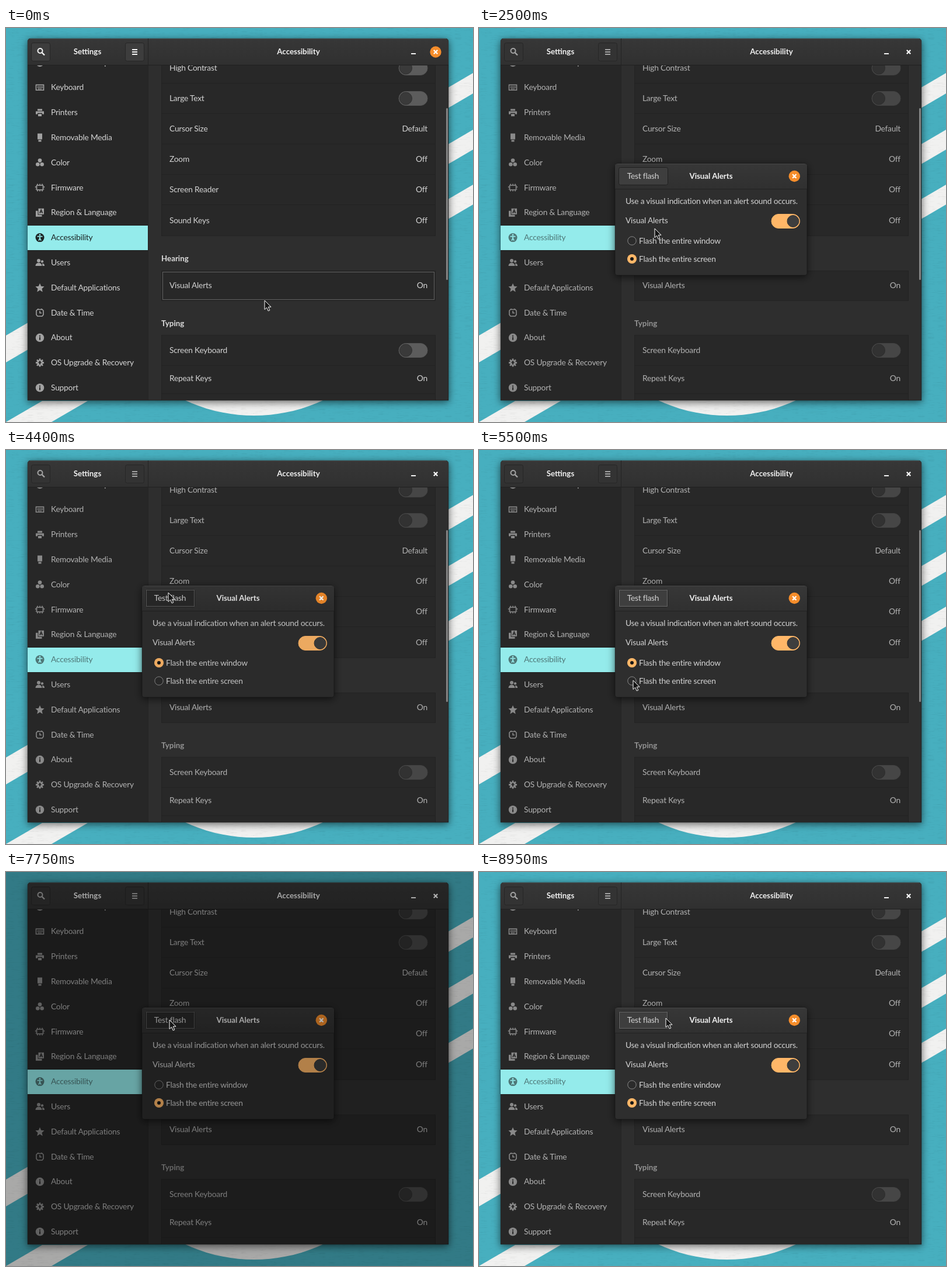
Recreate the animation shown at these times as an HTML page. Size 800 px wide and 674 px high, loop 9000 ms.

```html
<!DOCTYPE html>
<html lang="en">
<head>
<meta charset="utf-8">
<title>Visual alerts settings</title>
<style>
  html, body { margin: 0; height: 100%; overflow: hidden; background: #47afbf; }
  svg { display: block; width: 100vw; height: 100vh; }
  text { font: 13.8px Lato, "Open Sans", sans-serif; letter-spacing: -.22px; fill: #d4d4d4; white-space: pre; }
  .bold { font-size: 13.3px; font-weight: 700; letter-spacing: 0; fill: #f2f2f2; }
  .end { text-anchor: end; }
  .mid { text-anchor: middle; }
  .dim { opacity: var(--dim); }
  .soft { opacity: var(--soft); }
  .heading { fill: #dcdcdc; }
  .active { opacity: var(--lit); }
  .icon { fill: #a2a2a2; stroke: #a2a2a2; stroke-width: 0; }
  .dark text, .dark .icon { fill: #1c2424; }
  .line { fill: none; stroke-width: 1.6; }
  .hole { fill: #272727; stroke: #272727; }
  .focus { fill: none; stroke: #999; stroke-dasharray: 1 1; }
</style>
</head>
<body>
<svg id="stage" viewBox="0 0 800 674"></svg>
<script>
const stage = document.getElementById('stage');

const rect = (x, y, w, h, fill, more = '') =>
  `<rect x="${x}" y="${y}" width="${w}" height="${h}" fill="${fill}" ${more}/>`;
const circle = (x, y, r, fill, more = '') =>
  `<circle cx="${x}" cy="${y}" r="${r}" fill="${fill}" ${more}/>`;
const path = (d, more = '') => `<path d="${d}" ${more}/>`;
const text = (x, y, label, cls = '') =>
  `<text x="${x}" y="${y}" class="${cls}">${label}</text>`;
const focusRing = (id, x, y, w, h) =>
  `<rect id="${id}" class="focus" x="${x + .5}" y="${y + .5}" width="${w}" height="${h}"/>`;
const cross = (x, y) =>
  path(`M${x - 3.2} ${y - 3.2}l6.4 6.4m0-6.4l-6.4 6.4`, 'stroke="#fff" stroke-width="2.2"');
const closeButton = (x, y) => circle(x, y, 9.7, '#f58d2b');

const icons = {
  keyboard: path('M-6.5-4.5h13v9h-13z', 'class="line"') +
    path('M-4-2h9M-4 .3h9M-3 2.6h6', 'class="line" stroke-dasharray="1.6 1"'),
  printer: path('M-4-6h8v3h-8zM-7-2h14v5h-3v-2h-8v2h-3zM-3 2.5h6v4h-6z'),
  media: path('M-4-7h8v10h-8zM-2.5 4h5v3h-5z'),
  color: circle(0, -3.6, 3.3, '') + circle(-3.7, 3, 3.3, '') + circle(3.7, 3, 3.3, ''),
  chip: path('M-5.5-3.8h11v7.6h-11z', 'class="line"') +
    path('M-5-5.5h10M-5 5.5h10M-7.3-2v4.5M7.3-2v4.5', 'class="line" stroke-dasharray="2 2"'),
  region: path('M-2.5-7h9.5v10h-9.5zM-7-3h3.5v7h7v3h-10.5z') +
    path('M-.3 1l2.5-6 2.5 6M.7-1h3', 'class="line hole" style="fill:none;stroke-width:1.4"'),
  access: circle(0, 0, 7.5, ''),
  users: circle(-2, -3.3, 3, '') + path('M-7.5 5.5c0-7 11-7 11 0z') +
    circle(4, -2, 2.2, '') + path('M4 1.3c3 0 4 2 4 4.2h-3.5z'),
  star: path('M0-7.5l2.2 5.1 5.4.5-4.1 3.7 1.2 5.4L0 4.4l-4.7 2.8 1.2-5.4-4.1-3.7 5.4-.5z'),
  clock: path('M-4-5.5h8l2 2v7l-2 2.5h-8l-2-2.5v-7z', 'class="line"') +
    path('M0-3v3.5h3M-3-7v2M3-7v2', 'class="line"'),
  info: circle(0, 0, 7.2, '') + path('M-1-4h2v2h-2zM-1-1h2v5h-2z', 'class="hole"'),
  gear: circle(0, 0, 5.2, '') + path('M0-7v14M-7 0h14M-5-5L5 5M5-5L-5 5', 'stroke-width="2.6"') +
    path('M-1.2 3v-2.8h-2L0-3.5 3.2.2h-2V3z', 'class="hole"'),
};
const figure = path('M-4.5-2h9M0-2v3.5M0 1l-2 4M0 1l2 4', 'fill="none" stroke="#94ebeb" stroke-width="1.8"') +
  circle(0, -4.6, 1.4, '#94ebeb');

const sidebarItems = [
  ['info', 'Mouse &amp; Touchpad'], ['keyboard', 'Keyboard'], ['printer', 'Printers'],
  ['media', 'Removable Media'], ['color', 'Color'], ['chip', 'Firmware'],
  ['region', 'Region &amp; Language'], ['access', 'Accessibility'], ['users', 'Users'],
  ['star', 'Default Applications'], ['clock', 'Date &amp; Time'], ['info', 'About'],
  ['gear', 'OS Upgrade &amp; Recovery'], ['info', 'Support'],
];

function sidebarItem([icon, label], i) {
  const y = 59 + 42.8 * i;
  const selected = icon === 'access';
  return (selected ? rect(37, 337, 206, 44, '#202020') + rect(37, 338, 206, 42, '#94ebeb') : '') +
    `<g class="${selected ? 'soft dark' : 'dim'}">
      <g class="icon" transform="translate(58 ${y})">${icons[icon]}${selected ? figure : ''}</g>
      ${text(77, y + 4.5, label)}</g>`;
}

const offSwitch = y => `<g class="soft">` +
  rect(673, y - 12, 49, 24, '#5c5c5c', 'rx="12" stroke="#565656"') +
  circle(685, y, 10.5, '#3a3a3a', 'stroke="#303030"') + '</g>';

const row = (y, label, value) => text(280, y + 4.5, label, 'dim') +
  (value ? text(722, y + 4.5, value, 'dim end') : offSwitch(y + .5));

const card = (y, h, ...separators) =>
  rect(266.5, y + .5, 469, h, '#282828', 'stroke="#232323"') +
  separators.map(s => rect(267, s, 468, 1, '#222')).join('');

const headerButton = (x, icon) =>
  rect(x + .5, 25.5, 32, 31, '#333', 'rx="3" stroke="#262626"') +
  `<rect class="active" x="${x + 1}" y="26" width="31" height="30" rx="3" fill="#3d3d3d"/>` +
  `<g class="soft" fill="none" stroke="#f4f4f4" stroke-width="2">${icon}</g>`;

const radio = (id, y, label) =>
  circle(262, y, 7.2, '#2b2b2b', 'stroke="#8a8a8a"') +
  `<g id="${id}">${circle(262, y, 8, '#ffb768')}${circle(262, y, 3, '#161616')}</g>` +
  text(274, y + 4.5, label);

const stripe = (x, y, h) => path(`M${x} ${y + 35}L${x + 60} ${y}V${y + h}L${x} ${y + h + 35}z`);

const wallpaper = rect(0, 0, 800, 674, '#47afbf') +
  `<g fill="#f1f1f0">` +
  stripe(0, 491, 46) + path('M0 674L62 638H140L78 674z') +
  stripe(740, 77, 35) + stripe(740, 174, 34) + stripe(740, 268, 34) +
  circle(425, 382, 281, '#f1f1f0') + '</g>' +
  rect(0, 0, 800, 674, '#000', 'filter="url(#grain)" opacity=".08"');

const settings = `<g filter="url(#shadow)">${path('M37 637V23a5 5 0 0 1 5-5H753a5 5 0 0 1 5 5V637z', 'fill="#2f2f2f" stroke="#000" stroke-opacity=".3"')}</g>` +
  rect(37, 64, 207, 573, '#272727') +
  path('M37 63V23a5 5 0 0 1 5-5H753a5 5 0 0 1 5 5V63z', 'fill="url(#header)"') +
  rect(41, 18, 713, 1, '#484848') + rect(37, 63, 721, 1, '#202020') + rect(243, 18, 1, 619, '#242424') +
  headerButton(43, circle(58.5, 39, 4, 'none') + path('M61.5 42L66 46.5', 'stroke-width="2.4"')) +
  headerButton(204, path('M216 37h9M216 41h9M216 45h9', 'stroke-width="1.8"')) +
  text(139.5, 45, 'Settings', 'bold mid') + text(501, 45, 'Accessibility', 'bold mid') +
  rect(694, 43, 8, 2, '#f0f0f0') +
  `<g class="active">${closeButton(736, 41)}</g>` + cross(736, 41) +
  `<g clip-path="url(#view)">
    ${sidebarItems.map(sidebarItem).join('')}
    ${card(40, 315, 94, 146, 198, 250, 302)}
    ${row(68, 'High Contrast')}${row(120, 'Large Text')}${row(172, 'Cursor Size', 'Default')}
    ${row(224, 'Zoom', 'Off')}${row(276.5, 'Screen Reader', 'Off')}${row(329, 'Sound Keys', 'Off')}
    ${text(266, 399, 'Hearing', 'bold heading soft')}
    ${card(415, 51)}${row(440, 'Visual Alerts', 'On')}
    <g class="active">${focusRing('rowFocus', 268, 417, 465, 47)}</g>
    ${text(266, 510, 'Typing', 'bold heading soft')}
    ${card(525, 130, 577, 625)}
    ${row(551, 'Screen Keyboard')}${row(599, 'Repeat Keys', 'On')}${text(280, 648, 'Cursor Blinking', 'dim')}
    ${rect(754, 137, 3, 294, '#858585', 'rx="1.5" id="scrollbar"')}
  </g>`;

const dialog = `<g id="dialog">
  <g filter="url(#shadow)">${rect(233, 232, 329, 191, '#2f2f2f', 'rx="4" stroke="#000" stroke-opacity=".3"')}</g>` +
  path('M233 275V236a4 4 0 0 1 4-4H558a4 4 0 0 1 4 4V275z', 'fill="url(#header)"') +
  rect(237, 232, 321, 1, '#484848') + rect(233, 275, 329, 1, '#222') +
  `<rect id="button" x="239.5" y="238.5" width="84" height="30" rx="3" stroke="#202020"/>` +
  focusRing('buttonFocus', 240, 239, 82, 28) +
  text(281, 257.5, 'Test flash', 'mid') + text(397.5, 257.5, 'Visual Alerts', 'bold mid') +
  closeButton(540.3, 253.5) + cross(540.3, 253.5) +
  text(251, 301, 'Use a visual indication when an alert sound occurs.') +
  text(251, 334, 'Visual Alerts') +
  rect(501, 318.5, 48.5, 24, '#ffb768', 'rx="12" stroke="#ffb768"') +
  circle(538, 330.5, 10, '#3e3e3e', 'stroke="#333"') +
  radio('windowDot', 364, 'Flash the entire window') +
  radio('screenDot', 395, 'Flash the entire screen') +
  focusRing('windowFocus', 250, 353, 300, 21) + focusRing('screenFocus', 250, 384, 300, 21) +
  rect(233, 232, 329, 191, '#000', 'id="windowFlash" rx="4"') + '</g>';

stage.innerHTML = `<defs>
    <linearGradient id="header" x2="0" y2="1"><stop stop-color="#373737"/><stop offset="1" stop-color="#303030"/></linearGradient>
    <filter id="shadow" x="-10%" y="-15%" width="120%" height="130%">
      <feDropShadow dx="0" dy="3" stdDeviation="7" flood-opacity=".6"/></filter>
    <filter id="grain" x="0" y="0" width="100%" height="100%">
      <feTurbulence baseFrequency=".06 .5" numOctaves="2" seed="4"/>
      <feColorMatrix values="0 0 0 0 0  0 0 0 0 0  0 0 0 0 0  1.6 0 0 0 -.5"/></filter>
    <clipPath id="view">${rect(37, 64, 721, 573, '#000')}</clipPath>
  </defs>` + wallpaper + settings + dialog +
  rect(0, 0, 800, 674, '#000', 'id="screenFlash"') +
  path('M0 0V15.5L3.6 12.2 6.2 18 8.8 16.9 6.3 11.2H11z',
    'id="cursor" fill="#151515" stroke="#fff" stroke-linejoin="round"');

// time, x, y of the pointer tip
const pointer = [
  [0, 443, 466], [450, 538, 427], [1500, 538, 427], [1550, 539, 427], [1650, 539, 427],
  [1950, 515, 350], [2200, 400, 316], [2500, 301, 343], [2600, 288, 335], [2900, 272, 322],
  [3250, 259, 353], [3550, 258, 353], [4000, 278, 244], [4800, 278, 244], [5050, 284, 310],
  [5300, 263, 394], [5450, 263, 394], [5500, 264, 394], [5850, 264, 394], [6350, 280, 233],
  [6450, 280, 233], [6600, 280, 253], [8850, 280, 253], [8950, 320, 250], [9000, 320, 250],
];

const el = id => document.getElementById(id);
const progress = (t, start, length) => Math.min(1, Math.max(0, (t - start) / length));
const within = (t, start, end) => t >= start && t < end;
const show = (id, on) => { el(id).style.opacity = Number(on); };
// Rises to 75% black and falls again, 50 ms each way.
const flash = (t, start) => .75 * Math.max(0, 1 - Math.abs(t - start - 50) / 50);

function pointerAt(t) {
  const i = pointer.findIndex(([time]) => time > t);
  const [t0, x0, y0] = pointer[i - 1];
  const [t1, x1, y1] = pointer[i];
  const p = (t - t0) / (t1 - t0);
  return [x0 + (x1 - x0) * p, y0 + (y1 - y0) * p];
}

function draw(t) {
  const unfocused = progress(t, 800, 250);
  stage.style.setProperty('--lit', 1 - unfocused);
  stage.style.setProperty('--dim', 1 - .2 * unfocused);
  stage.style.setProperty('--soft', 1 - .42 * unfocused);

  const opened = progress(t, 800, 150);
  show('dialog', opened);
  el('dialog').setAttribute('transform', `translate(0 ${328 * (1 - opened)}) scale(1 ${opened})`);

  const windowChosen = within(t, 3400, 5700);
  show('windowDot', windowChosen);
  show('screenDot', !windowChosen);
  show('windowFocus', within(t, 3400, 4200));
  show('screenFocus', within(t, 5700, 7550));
  show('buttonFocus', within(t, 4200, 5700) || t >= 7550);
  show('scrollbar', t < 7750);
  const pressed = within(t, 4200, 4450) || within(t, 7550, 7800);
  el('button').setAttribute('fill', pressed ? '#292929' : '#3e3e3e');

  show('windowFlash', flash(t, 4395));
  show('screenFlash', flash(t, 7730));
  el('cursor').setAttribute('transform', `translate(${pointerAt(t)})`);
}

function tick() {
  draw(Math.floor(performance.now() % 9000 / 50) * 50);
  requestAnimationFrame(tick);
}
tick();
</script>
</body>
</html>
```
